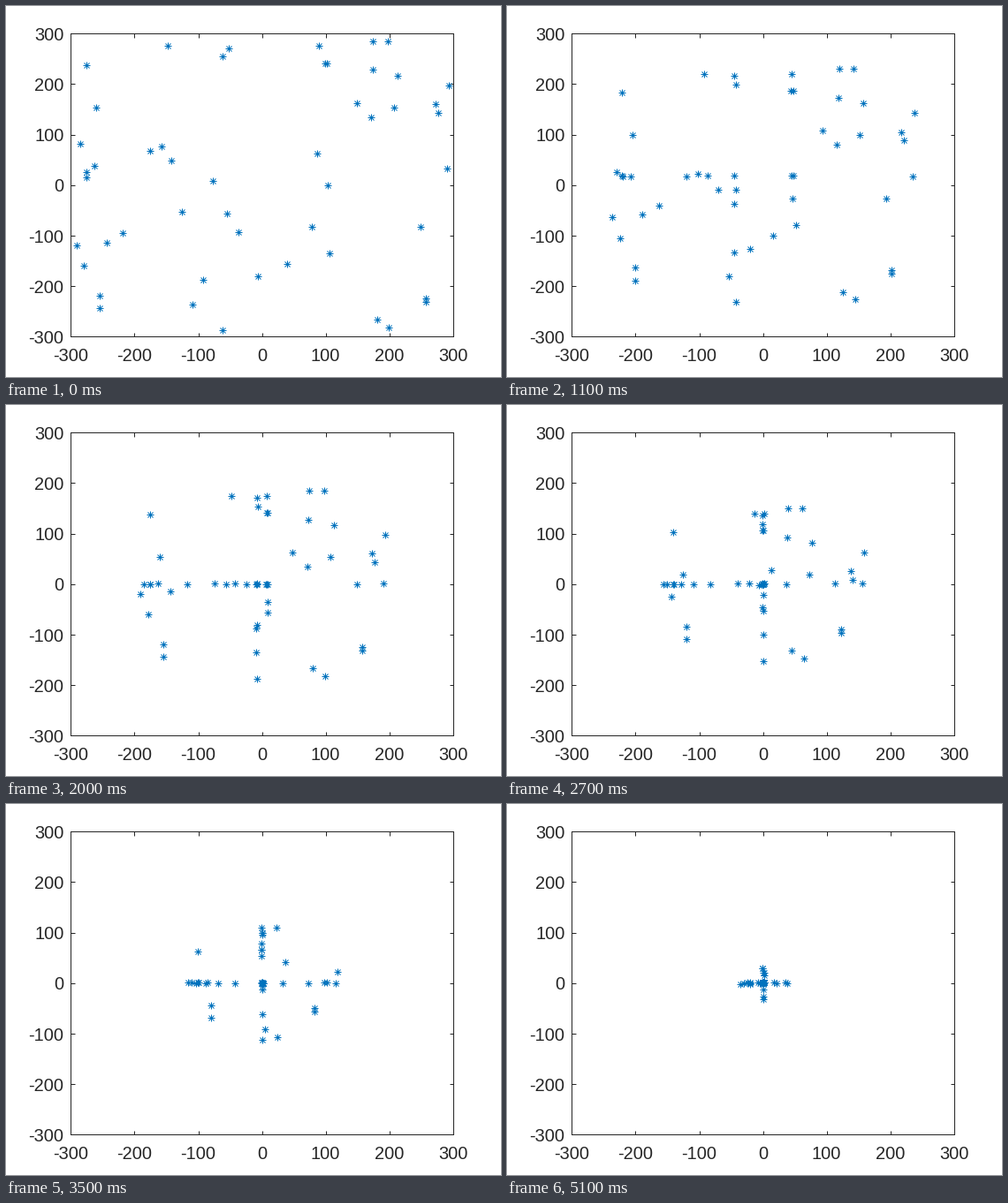
Animation, 560 px wide and 420 px high, one loop 5.2 s. Source, as a matplotlib script:

```python
import numpy as np
import matplotlib.pyplot as plt
from matplotlib.animation import FuncAnimation

W, H, DPI = 560, 420, 100
PX = 72 / DPI                      # one pixel in points
FRAMES, INTERVAL = 52, 100
LEFT, RIGHT, TOP, BOTTOM = 73, 506, 31, 374
LIMIT, STEP = 300, 5
INK, BLUE = "#262626", "#0072BD"

START = np.array([
    (-276, 238), (-260, 154), (-285, 81), (-263, 38), (-276, 26),
    (-275, 16), (-175, 67), (-157, 77), (-142, 49), (-148, 275),
    (-62, 254), (-52, 271), (89, 275), (99, 241), (102, 241),
    (174, 285), (197, 285), (173, 228), (212, 217), (148, 163),
    (171, 135), (207, 154), (272, 160), (276, 143), (293, 198),
    (290, 32), (248, -82), (86, 63), (103, 0), (78, -82),
    (106, -135), (39, -156), (-6, -181), (-37, -93), (-55, -56),
    (-77, 9), (-125, -53), (-218, -95), (-244, -114), (-291, -119),
    (-279, -160), (-255, -219), (-255, -244), (-109, -236), (-92, -188),
    (-62, -287), (180, -267), (199, -282), (257, -224), (257, -231),
], dtype=float)

# Two points start between the gathering lines and drift in slowly:
# index -> (distance from the centre to hold, early speed)
STRAYS = {31: (17, 2), 32: (21, 1.4)}


def goals(t):
    """Gathering lines that close in on the axes."""
    x, y = START.T
    reach = np.full(len(START), max(0, 88 - 4 * t), dtype=float)
    for i, (hold, _) in STRAYS.items():
        reach[i] = min(reach[i], hold)
    gx = np.where(x >= 0, reach, -reach)
    gy = np.where(y >= 0, max(0, 40 - 2 * t), min(0, t - 20))
    return np.column_stack([gx, gy])


def simulate():
    rng = np.random.default_rng(4)
    pos = START.copy()
    track = [pos.copy()]
    for t in range(1, FRAMES):
        speed = np.full(pos.shape, float(STEP))
        if t <= 11:
            for i, (_, slow) in STRAYS.items():
                speed[i, 0] = slow
        gap = goals(t) - pos
        pos = pos + np.clip(gap, -speed, speed)
        arrived = np.abs(gap) <= speed
        track.append(pos + arrived * rng.uniform(-1.5, 1.5, pos.shape))
    return track


def label(x, y, value, align):
    fig.text(x / W, 1 - y / H, str(value), ha=align, va="baseline",
             family="Liberation Sans", size=20 * PX, color=INK)


fig = plt.figure(figsize=(W / DPI, H / DPI), dpi=DPI, facecolor="white")
ax = fig.add_axes([(LEFT + 0.2) / W, (H - BOTTOM - 0.2) / H,
                   (RIGHT - LEFT) / W, (BOTTOM - TOP) / H])
ax.set(xlim=(-LIMIT, LIMIT), ylim=(-LIMIT, LIMIT))
ticks = range(-LIMIT, LIMIT + 1, 100)
ax.set_xticks(ticks)
ax.set_yticks(ticks)
ax.tick_params(direction="in", length=4.5 * PX, width=PX, color=INK,
               top=True, right=True, labelbottom=False, labelleft=False)
for spine in ax.spines.values():
    spine.set(linewidth=PX, color=INK)

for v in ticks:
    part = (v + LIMIT) / (2 * LIMIT)
    label(LEFT + part * (RIGHT - LEFT), 402, v, "center")
    label(65.5, BOTTOM - part * (BOTTOM - TOP) + 8, v, "right")

# Each star is an upright cross over a smaller diagonal one.
stars = [ax.plot([], [], mark, ls="none", ms=size * PX, mew=PX, color=BLUE,
                 clip_on=False, zorder=3)[0]
         for mark, size in (("+", 8), ("x", 6))]
track = simulate()


def draw(n):
    for star in stars:
        star.set_data(*track[n].T)
    return stars


anim = FuncAnimation(fig, draw, frames=FRAMES, interval=INTERVAL,
                     repeat=True, repeat_delay=0)
plt.show()
```
